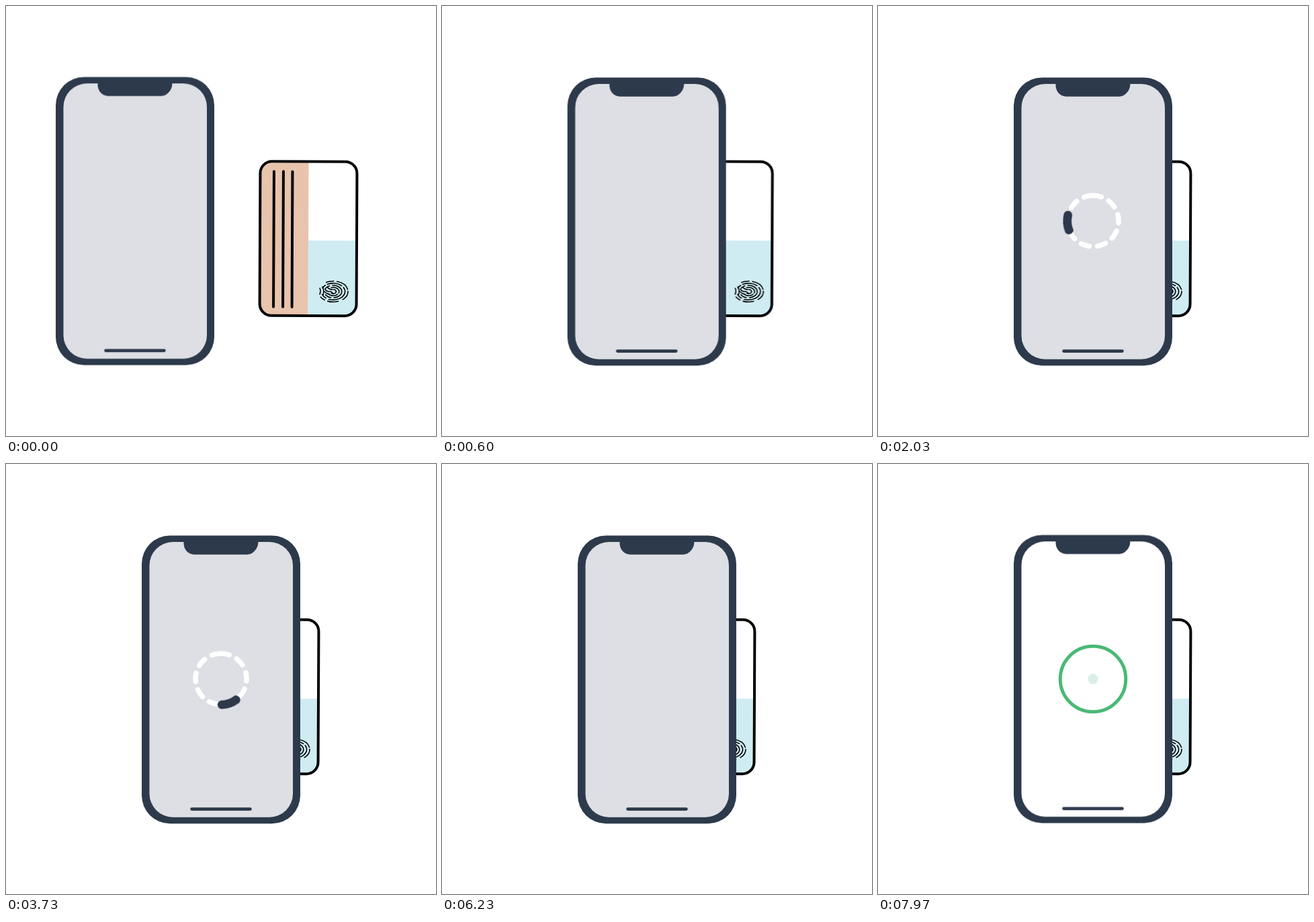
These frames come from a looping animation (640 px wide and 640 px high, 8 s). An HTML page:

```html
<!DOCTYPE html>
<html lang="en">
<head>
<meta charset="utf-8">
<title>Card scan</title>
<style>
  html, body { margin: 0; width: 100%; height: 100%; overflow: hidden; background: #fff; }
  svg { display: block; width: 100%; height: 100%; }
  .line { fill: none; stroke-linecap: round; }
  #arc, #ring { transform-origin: 320px 320px; }
</style>
</head>
<body>
<svg viewBox="0 0 640 640">
  <g id="card">
    <g transform="rotate(.25 450 346)">
      <rect x="378" y="231.5" width="144" height="229.5" rx="17.5" fill="#fff"/>
      <path d="M450 232H395.500a17.500 17.500 0 0 0-17.500 17.500V443.500a17.500 17.500 0 0 0 17.500 17.500H450Z" fill="#e8c4ad"/>
      <path d="M450 349H522V443.500a17.500 17.500 0 0 1-17.500 17.500H450Z" fill="#cfecf2"/>
      <path class="line" stroke="#000" stroke-width="4" d="M398.500 246.500V448M412.500 246.500V448M426 246.500V448"/>
      <rect class="line" x="378" y="231.500" width="144" height="229.500" rx="17.500" stroke="#000" stroke-width="4"/>
    </g>
    <g id="print" class="line" stroke="#000" stroke-width="1.6"></g>
  </g>

  <g id="phone">
    <rect x="74" y="106.500" width="236" height="428.800" rx="42" fill="#2d3a4b"/>
    <rect id="screen" x="85.500" y="116" width="213.500" height="409.700" rx="35" fill="#dddfe4"/>
    <path d="M136.500 114H247.300V118C247 125 240 134.800 231 134.800H152C143 134.500 136.500 127 136.500 118Z" fill="#2d3a4b"/>
    <path class="line" stroke="#2d3a4b" stroke-width="4.600" d="M148.500 513.600H235.500"/>
  </g>

  <g id="spinner" class="line">
    <circle cx="320" cy="320" r="38" stroke="#fff" stroke-width="7.500" pathLength="360"
      stroke-dasharray="19 18.700" transform="rotate(-90 320 320)"/>
    <circle id="arc" cx="320" cy="320" r="38.300" stroke="#2d384b" stroke-width="12.700" pathLength="360"
      stroke-dasharray="34 326"/>
  </g>

  <circle id="dot" cx="320" cy="320" r="51" fill="#d9efe5"/>
  <circle id="ring" class="line" cx="320" cy="320" r="48.800" stroke="#49b975" stroke-width="5"
    pathLength="100" stroke-dasharray="100 100" style="stroke-linecap:butt"/>
</svg>
<script>
  const LOOP = 8000;
  const $ = id => document.getElementById(id);

  // Nested ridges, open to the left: [radius step, start angle, end angle]
  const ridges = [
    [1, -80, 125], [2, -110, 20], [2, 42, 150], [3, -95, 85], [3, 105, 150],
    [4, -120, -45], [4, -30, 112], [5, -75, -12], [5, -2, 50], [5, 70, 112],
    [3, -150, -115], [4, -155, -132], [5, -118, -88], [4, 128, 160], [5, 126, 148]
  ];
  const at = (k, deg) => {
    const a = deg * Math.PI / 180;
    return `${(487 + 4.4 * k * Math.cos(a)).toFixed(2)} ${(425 + 3.1 * k * Math.sin(a)).toFixed(2)}`;
  };
  const loops = ridges.map(([k, a, b]) =>
    `M${at(k, a)}A${4.4 * k} ${3.1 * k} 0 ${b - a > 180 ? 1 : 0} 1 ${at(k, b)}`).join('');
  const tails = 'M467 420q2 4 0 9M471 418q3 5 1 12M475 421q1 4 6 4t5 3M474 425q4 4 8 4M479 419q2 3 7 3';
  $('print').innerHTML = `<path d="${loops}${tails}"/>`;

  // Steps are [time in ms, value]; the ends hold.
  function play(id, prop, steps, easing = 'linear') {
    const all = [[0, steps[0][1]], ...steps, [LOOP, steps[steps.length - 1][1]]];
    $(id).animate(
      all.map(([t, v]) => ({ offset: t / LOOP, [prop]: v, easing })),
      { duration: LOOP, iterations: Infinity });
  }
  const move = (x, y = 0) => `translate(${x}px, ${y}px)`;
  const turn = deg => `rotate(${deg}deg)`;

  play('card', 'transform', [[20, move(0)], [1100, move(-57)]]);
  play('phone', 'transform', [
    [20, move(0, -.8)], [370, move(68)], [680, move(128)],
    [6230, move(128)], [6630, move(128, -.8)]
  ]);
  play('screen', 'fill', [[6230, '#dddfe4'], [6630, '#ffffff']]);
  play('spinner', 'opacity', [[800, 0], [1000, 1], [5900, 1], [6220, 0]]);
  play('arc', 'transform', [[0, turn(-145.5)], [LOOP, turn(1054.5)]]);
  play('ring', 'opacity', [[7110, 0], [7110, 1]]);
  play('ring', 'strokeDashoffset', [[7110, 100], [7950, 0]], 'ease-in-out');
  play('ring', 'transform', [[0, turn(-90)]]);
  play('dot', 'transform', [[7900, 'scale(0)'], [7970, 'scale(.147)'], [LOOP, 'scale(.21)']]);
  $('dot').style.transformOrigin = '320px 320px';
</script>
</body>
</html>
```
